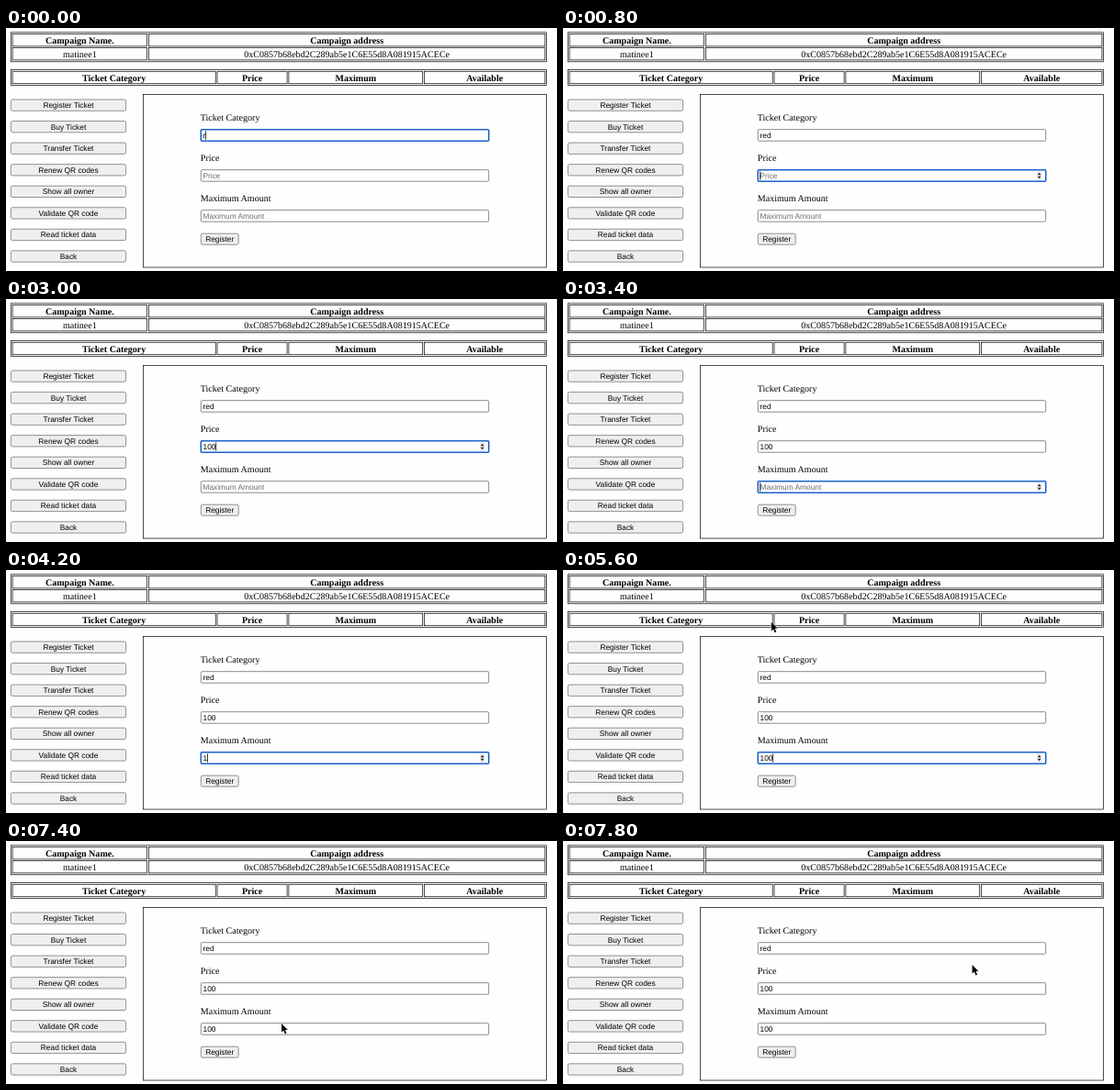
An HTML page for the animation above (8000 ms loop, 600 by 265 pixels).

```html
<!DOCTYPE html>
<html lang="en">
<head>
<meta charset="utf-8">
<title>Ticket registration</title>
<style>
  html, body { margin: 0; height: 100%; overflow: hidden; background: #fefefe; }
  svg { display: block; width: 100vw; height: 100vh; }
  text { font: 10.05px "Liberation Serif", Times, serif; text-rendering: geometricPrecision; }
  .bold { font-weight: bold; }
  .ui { font: 8.35px "Liberation Sans", Arial, sans-serif; }
  .middle { text-anchor: middle; }
  .line { fill: none; stroke: #000; stroke-width: .7; }
  .button { fill: #efefef; stroke: #6f6f6f; stroke-width: .75; }
  .input { fill: #fff; stroke: #767676; stroke-width: .85; }
  .input.focus { stroke: #1b62cb; stroke-width: 1.6; }
  .placeholder { fill: #6c6c6c; }
</style>
</head>
<body>
<svg id="stage" viewBox="0 0 600 265"></svg>
<script>
const stage = document.getElementById('stage');

function add(tag, attrs, content = '') {
  const node = document.createElementNS('http://www.w3.org/2000/svg', tag);
  for (const key in attrs) node.setAttribute(key, attrs[key]);
  node.textContent = content;
  return stage.appendChild(node);
}
const box = (cls, x, y, width, height, rx = 0) =>
  add('rect', { class: cls, x, y, width, height, rx });
const label = (cls, x, y, content) => add('text', { class: cls, x, y }, content);

// Bordered table: edges are the centres of the column gaps.
function table(top, edges, rows) {
  box('line', 5.4, top, 583.2, rows.length * 15 + 2);
  rows.forEach((cells, r) => cells.forEach((content, c) => {
    const left = edges[c] + .9, right = edges[c + 1] - .9, y = top + 1.7 + r * 15;
    box('line', left, y, right - left, 13.4);
    label(r ? 'middle' : 'middle bold', (left + right) / 2, y + 10.2, content);
  }));
}

function button(x, y, width, height, content) {
  const face = box('button', x, y, width, height, 1.8);
  label('ui middle', x + width / 2, y + height / 2 + 2.9, content);
  return face;
}

table(4.8, [6.2, 154.5, 587.8], [
  ['Campaign Name.', 'Campaign address'],
  ['matinee1', '0xC0857b68ebd2C289ab5e1C6E55d8A081915ACECe']
]);
table(45.6, [6.2, 229.1, 307, 454.6, 587.8], [
  ['Ticket Category', 'Price', 'Maximum', 'Available']
]);

['Register Ticket', 'Buy Ticket', 'Transfer Ticket', 'Renew QR codes',
 'Show all owner', 'Validate QR code', 'Read ticket data', 'Back']
  .forEach((name, i) => button(5.4, 78 + i * 23.55, 125.2, 12.3, name));

box('line', 149.5, 72.6, 439.1, 188.4);

const fields = ['Ticket Category', 'Price', 'Maximum Amount'].map((name, i) => {
  const y = 110.7 + i * 44;
  label('', 211.8, y - 9.6, name);
  const frame = box('input', 212.3, y, 313.4, 12.5, 1);
  const value = label('ui', 214.5, y + 9.3, '');
  const spinner = add('g', {});
  spinner.append(
    add('rect', { x: 515.6, y: y + 1.4, width: 6.2, height: 9.8, rx: 2, fill: '#ececec' }),
    add('path', {
      d: `M518.7 ${y + 3}l1.9 2.5h-3.8zM518.7 ${y + 9.6}l1.9 -2.5h-3.8z`, fill: '#222'
    }));
  return { name, y, frame, value, spinner };
});

const register = button(212.3, 224.2, 40.9, 12, 'Register');
const caret = add('rect', { width: .8, height: 9.4 });
const cursor = add('path', {
  d: 'M0 0V9.6L2.2 7.6L3.9 11.4L5.5 10.7L3.9 7H6.8Z',
  stroke: '#fff', 'stroke-width': .8, 'paint-order': 'stroke'
});

// Each step: start time, focused field (-1 for none), caret shown, values.
const steps = [
  [0, 0, 1, 'r'], [400, 0, 1, 'red'],
  [800, 1, 1, 'red'], [1000, 1, 0, 'red'], [1200, 1, 1, 'red'],
  [1400, 1, 1, 'red', '1'], [1600, 1, 1, 'red', '10'],
  [2200, 1, 0, 'red', '10'], [2600, 1, 1, 'red', '10'], [3000, 1, 1, 'red', '100'],
  [3400, 2, 1, 'red', '100'], [3800, 2, 0, 'red', '100'], [4000, 2, 1, 'red', '100'],
  [4200, 2, 1, 'red', '100', '1'], [4400, 2, 1, 'red', '100', '10'],
  [4600, 2, 1, 'red', '100', '100'], [5000, 2, 0, 'red', '100', '100'],
  [5400, 2, 1, 'red', '100', '100'], [6000, 2, 0, 'red', '100', '100'],
  [6600, 2, 1, 'red', '100', '100'], [7000, 2, 0, 'red', '100', '100'],
  [7400, -1, 0, 'red', '100', '100']
];
const pointer = [
  [5000, 581, -2], [5200, 470, 14], [5400, 330, 36], [5600, 226.8, 56.8],
  [5800, 226, 130], [6000, 229, 214], [6200, 231, 247], [6400, 231.5, 227],
  [7400, 300, 199], [7600, 380, 165], [7800, 445.6, 135]
];
const current = (list, t) => list.filter(item => item[0] <= t).pop();

function draw(now) {
  const t = now % 8000;
  const [, focus, blink, ...values] = current(steps, t);
  fields.forEach(({ name, frame, value, spinner }, i) => {
    frame.setAttribute('class', i === focus ? 'input focus' : 'input');
    value.textContent = values[i] || name;
    value.setAttribute('class', values[i] ? 'ui' : 'ui placeholder');
    spinner.style.display = i && i === focus ? '' : 'none';
  });

  caret.style.display = blink ? '' : 'none';
  if (blink) {
    const { value, y } = fields[focus];
    caret.setAttribute('x', 214.4 + (values[focus] ? value.getComputedTextLength() : 0));
    caret.setAttribute('y', y + 1.6);
  }

  const place = current(pointer, t);
  cursor.style.display = place ? '' : 'none';
  if (place) cursor.setAttribute('transform', `translate(${place[1]} ${place[2]})`);
  register.style.fill = t < 6400 || t >= 7400 ? '' : t < 6600 ? '#d9d9d9' : '#e5e5e5';
  requestAnimationFrame(draw);
}
requestAnimationFrame(draw);
</script>
</body>
</html>
```
